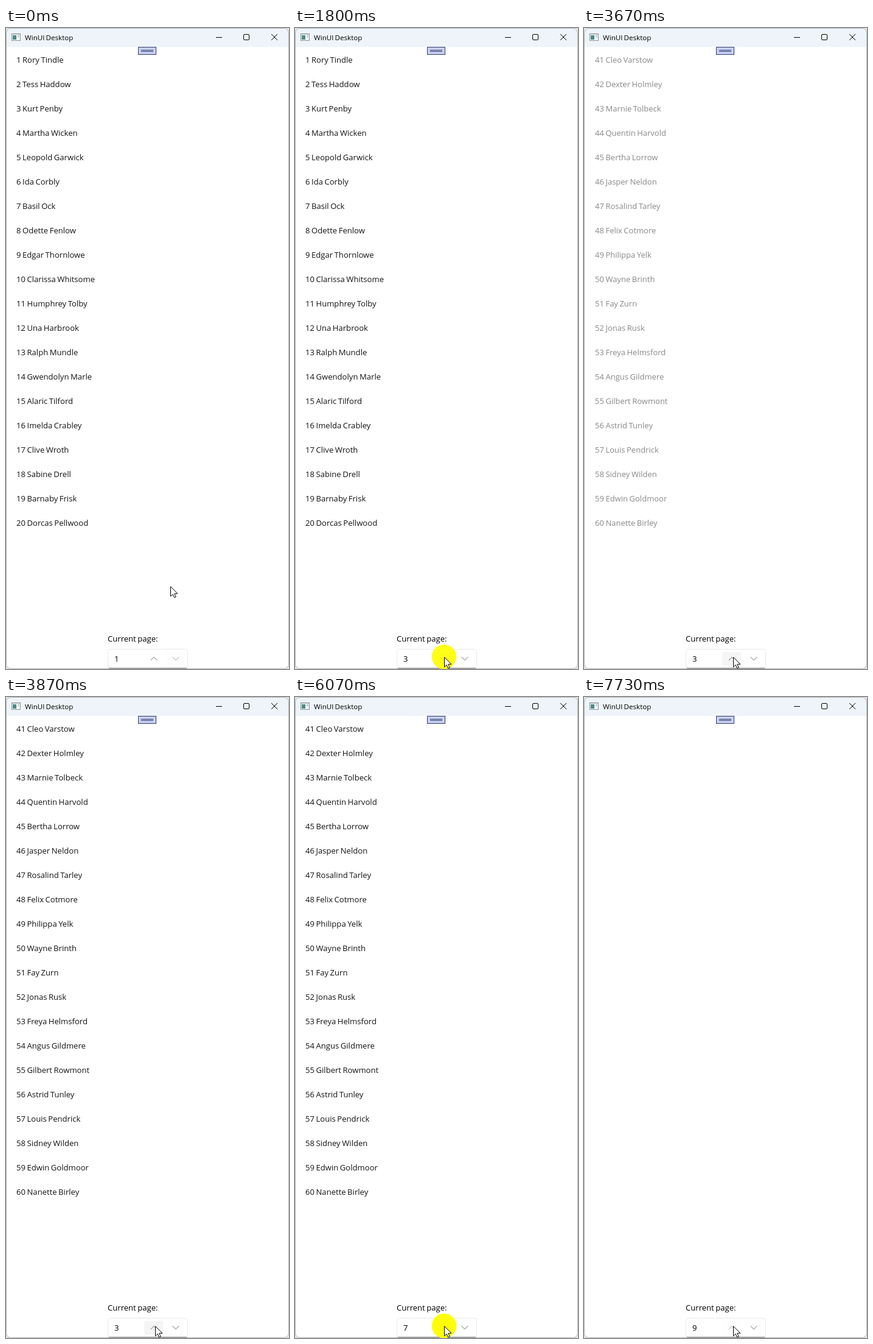
An HTML page for the animation above (8 s loop, 465 px wide and 1052 px high).

```html
<!DOCTYPE html>
<html lang="en">
<head>
<meta charset="utf-8">
<title>WinUI Desktop</title>
<style>
  html, body { margin: 0; width: 100%; height: 100%; overflow: hidden; background: #e4e4e4; }
  svg { display: block; width: 465px; height: 1052px; }
  text { font: 13.1px "Open Sans", "Noto Sans", sans-serif; fill: #000; white-space: pre; word-spacing: -.9px; }
  #list text { fill: #141414; }
  .title { font-size: 11.6px; }
  .line { fill: none; stroke: #000; }
  .chevron { fill: none; stroke: #6c6c6c; stroke-linecap: round; stroke-linejoin: round; }
  .off { stroke: #a6a6a6; }
</style>
</head>
<body>
<svg viewBox="0 0 465 1052">
  <defs>
    <clipPath id="frame"><rect width="465" height="1052" rx="8"/></clipPath>
    <clipPath id="field"><rect x="167" y="1019" width="132" height="32" rx="4"/></clipPath>
  </defs>

  <g clip-path="url(#frame)">
    <rect width="465" height="1052" fill="#fff"/>
    <rect width="465" height="31" fill="#eef4f9"/>
  </g>

  <!-- title bar -->
  <rect x="9.5" y="9.5" width="14" height="11" fill="#f4f6f7" stroke="#8b9299"/>
  <path d="M10 10.5H23" stroke="#c3ccd4"/>
  <rect x="11" y="12" width="6" height="7" fill="#4a8a88"/>
  <path d="M19 12.5h3M19 14.5h3" stroke="#a9b1b8"/>
  <text class="title" x="31" y="20">WinUI Desktop</text>
  <path class="line" d="M345 15.5h10"/>
  <rect class="line" x="390.5" y="10.5" width="9" height="9" rx="1.5"/>
  <path class="line" d="M436 10l10 10M446 10l-10 10"/>

  <!-- debug handle -->
  <rect x="217.5" y="31.5" width="29" height="12" fill="#c6d0f2" stroke="#343e6c"/>
  <path d="M222 36.5h20M222 38.5h20" stroke="#343e6c"/>

  <g id="list"></g>

  <!-- number box -->
  <text x="167" y="1007">Current page:</text>
  <rect x="167.5" y="1019.5" width="131" height="31" rx="4" fill="#fff" stroke="#e9e9e9"/>
  <rect x="167" y="1050" width="132" height="1" fill="#868686" clip-path="url(#field)"/>
  <text id="value" x="178" y="1040">1</text>
  <rect id="upFill" x="227" y="1024" width="31" height="22" rx="3"/>
  <rect id="downFill" x="263" y="1024" width="31" height="22" rx="3" fill="#fdfdfd"/>
  <path id="up" class="chevron" d="M238 1037.5l5-5 5 5"/>
  <path id="down" class="chevron" d="M274 1032.5l5 5 5-5"/>

  <rect x=".5" y=".5" width="464" height="1051" rx="7.5" fill="none" stroke="#b0b0b0"/>

  <g id="clicks" fill="#ff0"></g>
  <path id="cursor" d="M.5 .7V16.8L4.2 13.3 6.6 18.8 9.2 17.7 6.8 12.2H11.9Z"
        fill="#fff" stroke="#000" stroke-linejoin="round"/>
</svg>

<script>
const TICK = 8000 / 120;   // the screen updates 15 times a second
const ROWS = 20, MID = 232.5;

const pages = [
  { first: 1, names: `Rory Tindle,Tess Haddow,Kurt Penby,Martha Wicken,Leopold Garwick,
    Ida Corbly,Basil Ock,Odette Fenlow,Edgar Thornlowe,Clarissa Whitsome,
    Humphrey Tolby,Una Harbrook,Ralph Mundle,Gwendolyn Marle,Alaric Tilford,
    Imelda Crabley,Clive Wroth,Sabine Drell,Barnaby Frisk,Dorcas Pellwood` },
  { first: 41, names: `Cleo Varstow,Dexter Holmley,Marnie Tolbeck,Quentin Harvold,Bertha Lorrow,
    Jasper Neldon,Rosalind Tarley,Felix Cotmore,Philippa Yelk,Wayne Brinth,
    Fay Zurn,Jonas Rusk,Freya Helmsford,Angus Gildmere,Gilbert Rowmont,
    Astrid Tunley,Louis Pendrick,Sidney Wilden,Edwin Goldmoor,Nanette Birley` }
].map(p => p.names.split(',').map((name, i) => `${p.first + i} ${name.trim()}`));

// ticks at which the page number goes up by one
const bumps = [25, 27, 78, 81, 85, 88, 92, 100];
// click highlights: [shown, starts to fade]
const presses = [[24, 33], [27, 33], [77, 85], [80, 88], [84, 92], [87, 96], [91, 108]];

const $ = id => document.getElementById(id);
function add(parent, tag, attrs) {
  const el = document.createElementNS('http://www.w3.org/2000/svg', tag);
  for (const k in attrs) el.setAttribute(k, attrs[k]);
  return parent.appendChild(el);
}

const rows = Array.from({ length: ROWS }, () =>
  add($('list'), 'text', { x: 17 - MID, y: 5 }));
const dots = presses.map(() => add($('clicks'), 'circle', { cx: 245, cy: 1032, r: 20 }));

// page shown, opacity and row scale
function listState(n) {
  if (n < 42) return [0, 1, 1];
  if (n === 42) return [0, .43, .91];
  if (n < 53) return [0, 0, 1];
  if (n < 58) return [1, (n - 52) / 6, 1 - .03 * .4 ** (n - 53)];
  if (n < 115) return [1, 1, 1];
  return n === 115 ? [1, .43, .91] : [1, 0, 1];
}

function cursorAt(n) {
  if (n >= 21) return [245, 1032];
  const k = Math.min(Math.max((n - 8) / 7, 0), 1);
  const p = k * k * (3 - 2 * k);
  return [270 - 36 * p + 57 * p * (1 - p), 916 + 111 * p];
}

function draw(n) {
  const [page, opacity, scale] = listState(n);
  $('list').setAttribute('opacity', opacity);
  rows.forEach((row, i) => {
    row.textContent = pages[page][i];
    row.setAttribute('transform', `translate(${MID} ${52 + 40 * i}) scale(${scale})`);
  });

  const value = 1 + bumps.filter(b => n >= b).length;
  $('value').textContent = value;
  $('up').classList.toggle('off', value === 9);
  $('down').classList.toggle('off', value === 1);
  $('downFill').setAttribute('opacity', value === 1 ? 1 : 0);
  $('upFill').setAttribute('fill', value === 9 ? '#fdfdfd' : n >= 15 ? '#f5f5f5' : '#fff');

  presses.forEach(([on, fade], i) => {
    const left = 1 - Math.max(n - fade + 1, 0) / 4;
    dots[i].setAttribute('opacity', n < on ? 0 : .7 * Math.max(left, 0));
  });

  $('cursor').setAttribute('transform', `translate(${cursorAt(n).map(Math.round)})`);
}

let last = -1;
function loop() {
  const n = Math.floor(performance.now() / TICK + .1) % 120;
  if (n !== last) draw(last = n);
  requestAnimationFrame(loop);
}
loop();
</script>
</body>
</html>
```
